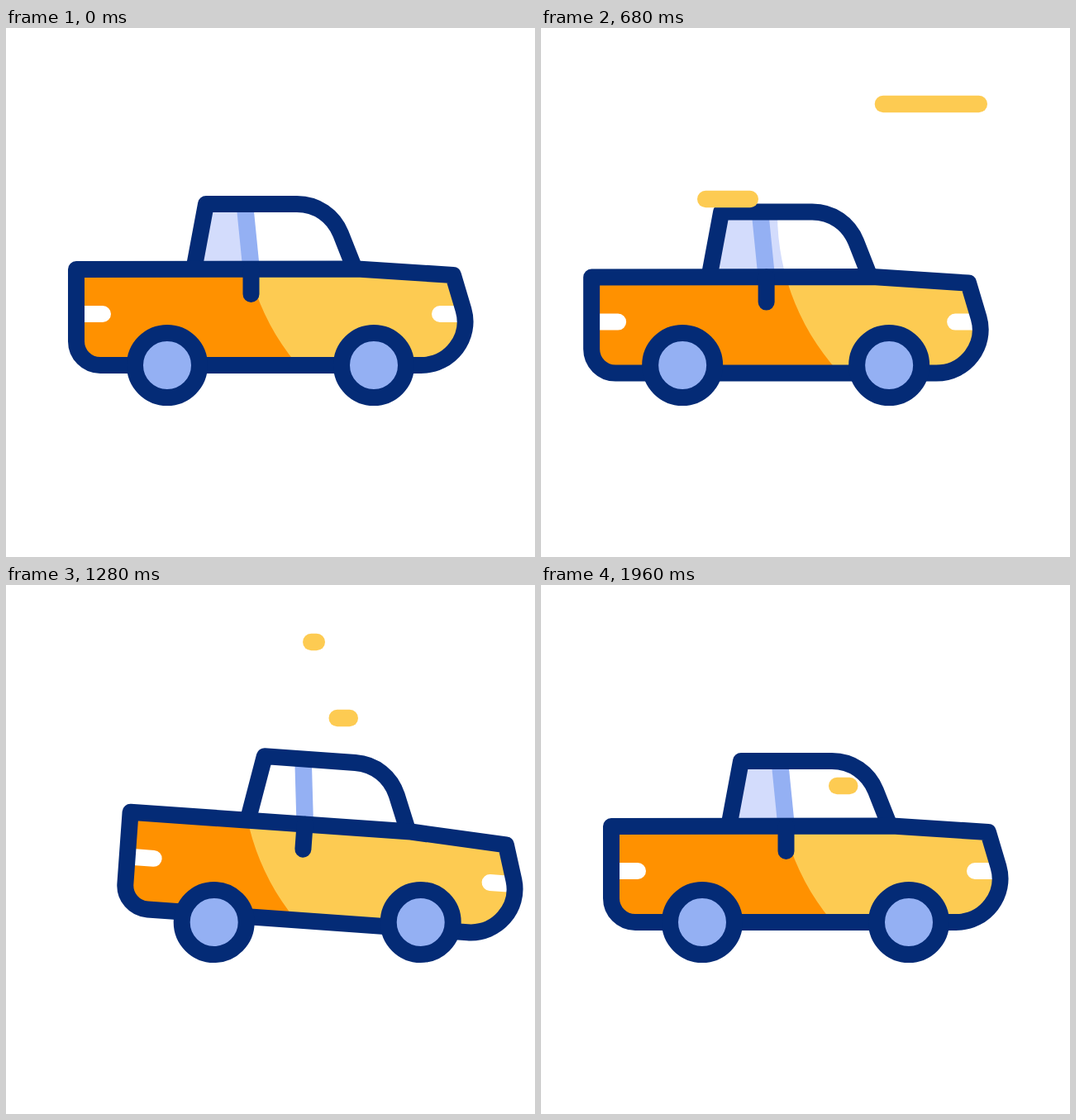
These frames come from a looping animation (640 px wide and 640 px high, 2000 ms). An HTML page:

```html
<!DOCTYPE html>
<html lang="en">
<head>
<meta charset="utf-8">
<title>Pickup truck</title>
<style>
  html, body { margin: 0; width: 100%; height: 100%; overflow: hidden; background: #fff; }
  svg { display: block; width: 100%; height: 100%; }
  .outline { fill: none; stroke: #042b76; stroke-width: 20; stroke-linecap: round; stroke-linejoin: round; }
</style>
</head>
<body>
<svg viewBox="0 0 640 640">
  <defs>
    <path id="body" d="M85 292L425 291.5L541 299L553.5 341C563 374 538 408 502 408H114A29 29 0 0 1 85 379Z"/>
    <path id="cab" d="M228 288L242 213H352C376 213 396 227 405 249L420 287"/>
    <clipPath id="shade"><path d="M0 0H570V-59A284 284 0 0 0 570 509V640H0Z"/></clipPath>
  </defs>

  <g class="chassis">
    <use href="#cab" fill="#fff"/>
    <use href="#body" fill="#fdcb52"/>
  </g>
  <!-- The shadow edge stays fixed on the stage while the truck moves. -->
  <g clip-path="url(#shade)">
    <g class="chassis">
      <use href="#cab" fill="#d3dcfc"/>
      <use href="#body" fill="#ff9100"/>
    </g>
  </g>
  <g class="chassis">
    <path d="M289.3 218L296.5 290" stroke="#94b0f3" stroke-width="20.5"/>
    <g fill="#fff">
      <rect x="75" y="336" width="52" height="20" rx="10"/>
      <rect x="515" y="336" width="42" height="20" rx="10"/>
    </g>
    <g class="outline">
      <use href="#cab"/>
      <use href="#body"/>
      <path d="M296.5 292V322"/>
    </g>
  </g>
  <g id="wheels" fill="#94b0f3" stroke="#042b76" stroke-width="20">
    <circle cx="195" cy="408" r="39"/>
    <circle cx="445" cy="408" r="39"/>
  </g>
  <g id="streaks" fill="#fdcb52"></g>
</svg>
<script>
  const LOOP = 2000;
  const SWEEP = 375;       // time for one end of a streak to cross its track
  const TAIL_DELAY = 217;
  const TRACK = 200;

  const shiftKeys = [[0, 0], [500, -67], [955, 56.7], [1440, 56.7], [1960, 0]];
  const tiltKeys = [[0, 0], [400, -2.4], [500, -2.4], [940, 4.1], [1580, 4.1], [1960, 0]];
  const bobKeys = [[0, 0], [130, 0], [690, 9.6], [1010, -6], [1500, 3], [1600, 3], [1960, 0]];

  const streaks = [
    { right: 540, y: 92, start: 473 },
    { right: 263, y: 207, start: 553 },
    { right: 610.5, y: 161, start: 753 },
    { right: 386, y: 69, start: 1239 },
    { right: 237, y: 223, start: 1279, height: 25.5 },
    { right: 568, y: 243, start: 1433 }
  ];

  const chassis = document.querySelectorAll('.chassis');
  const wheels = document.getElementById('wheels');
  const streakLayer = document.getElementById('streaks');

  for (const streak of streaks) {
    const height = streak.height || 20.5;
    const rect = document.createElementNS('http://www.w3.org/2000/svg', 'rect');
    rect.setAttribute('y', streak.y - height / 2);
    rect.setAttribute('height', height);
    rect.setAttribute('rx', 10.2);
    streak.rect = streakLayer.appendChild(rect);
  }

  function ease(u) {
    u = Math.min(1, Math.max(0, u));
    return u * u * (3 - 2 * u);
  }

  function valueAt(keys, t) {
    const next = keys.findIndex(key => key[0] > t);
    if (next < 0) return keys[keys.length - 1][1];
    const [t0, v0] = keys[next - 1];
    const [t1, v1] = keys[next];
    return v0 + (v1 - v0) * ease((t - t0) / (t1 - t0));
  }

  function drawStreak({ rect, right, start }, t) {
    const head = TRACK * ease((t - start) / SWEEP);
    const tail = TRACK * ease((t - start - TAIL_DELAY) / SWEEP);
    const length = head - tail;
    rect.setAttribute('visibility', length > 0.3 ? 'visible' : 'hidden');
    rect.setAttribute('x', right - 20 - head);
    rect.setAttribute('width', length + 20);
  }

  function render(t) {
    const shift = valueAt(shiftKeys, t);
    const pose = `translate(${shift} ${valueAt(bobKeys, t)}) rotate(${valueAt(tiltKeys, t)} 320 408)`;
    chassis.forEach(part => part.setAttribute('transform', pose));
    wheels.setAttribute('transform', `translate(${shift} 0)`);
    streaks.forEach(streak => drawStreak(streak, t));
  }

  const begin = performance.now();
  function tick() {
    render((performance.now() - begin) % LOOP);
    requestAnimationFrame(tick);
  }
  render(0);
  requestAnimationFrame(tick);
</script>
</body>
</html>
```
